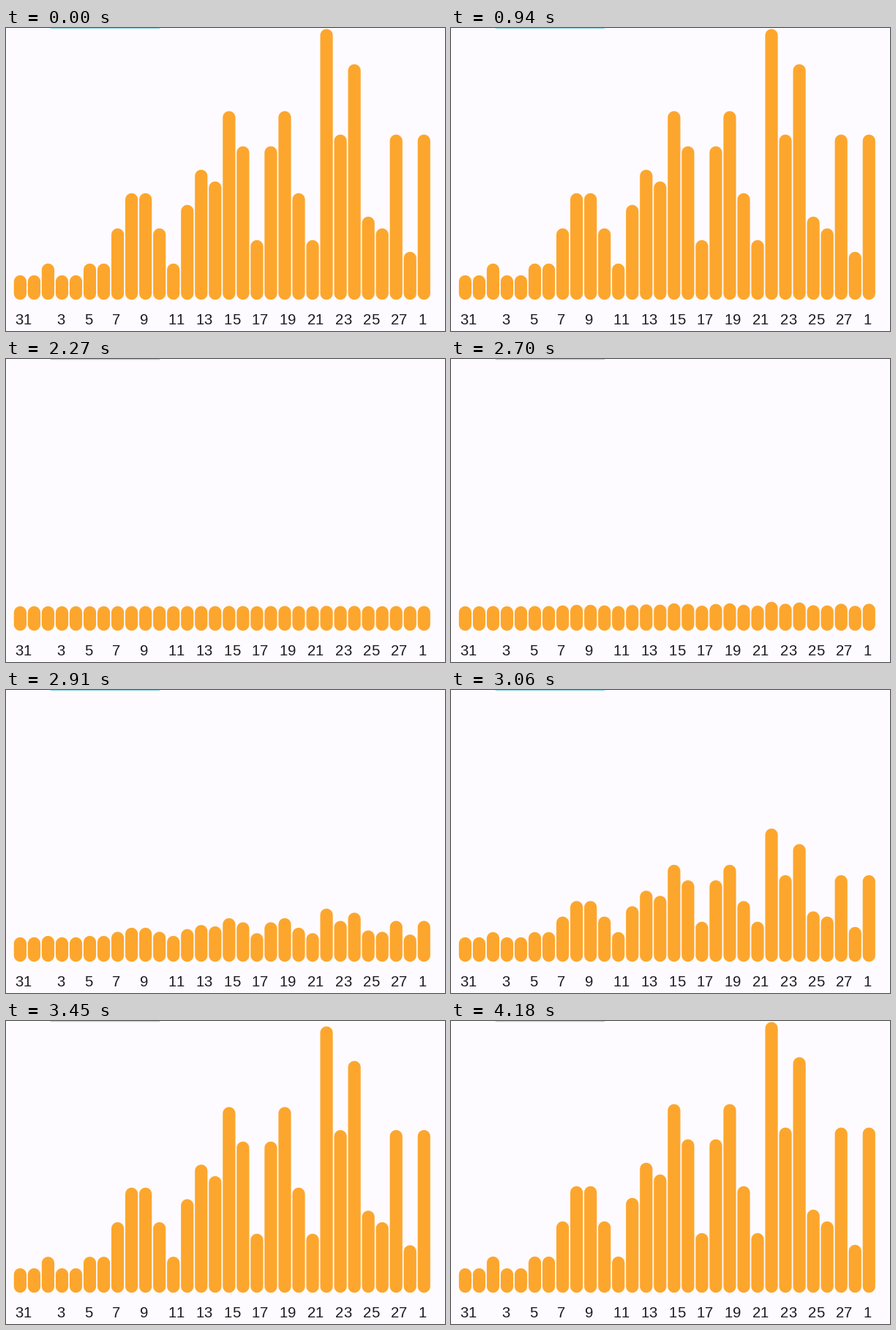
These frames come from a looping animation (600 px wide and 414 px high, 5.24 s). A matplotlib script:

```python
import matplotlib.pyplot as plt
from matplotlib.animation import FuncAnimation
from matplotlib.collections import LineCollection

W, H, DPI = 600, 414, 64
LOOP, STEP = 5240, 10
PT = 72 / DPI  # points per pixel

BACKGROUND, ORANGE, INK, BLUE = "#fdfbff", "#fda62d", "#1d1b20", "#9bdaea"
VALUES = [0, 0, 1, 0, 0, 1, 1, 4, 7, 7, 4, 1, 6, 9, 8, 14, 11, 3, 11, 14,
          7, 3, 21, 12, 18, 5, 4, 12, 2, 12]

FIRST_X, PITCH, BAR_WIDTH = 19.4, 19.03, 17.2
FLOOR, BASE_TOP, UNIT = 371.3, 337.8, 16.02
SHRINK = (1790, 2294)
GROW = (2294, 3854)


def ease_in_out_expo(t):
    if t <= 0:
        return 0.0
    if t >= 1:
        return 1.0
    if t < 0.5:
        return 0.5 * 2 ** (20 * t - 10)
    return 1 - 0.5 * 2 ** (10 - 20 * t)


def progress(ms, span):
    start, end = span
    return ease_in_out_expo((ms - start) / (end - start))


def bar_scale(ms):
    if ms < GROW[0]:
        return 1 - progress(ms, SHRINK)
    return progress(ms, GROW)


def bar_x(i):
    return FIRST_X + PITCH * i


def bar_segments(scale):
    cap = BAR_WIDTH / 2
    return [[(bar_x(i), FLOOR - cap),
             (bar_x(i), BASE_TOP - UNIT * value * scale + cap)]
            for i, value in enumerate(VALUES)]


def draw_label(i, text):
    # Digits are placed one by one so that every digit has the same advance.
    for k, digit in enumerate(text):
        ax.text(bar_x(i) - 7.3 + 11.2 * k, 405.3, digit, color=INK,
                family="Liberation Sans", size=20.3 * PT,
                ha="left", va="baseline")


fig = plt.figure(figsize=(W / DPI, H / DPI), dpi=DPI, facecolor=BACKGROUND)
ax = fig.add_axes([0, 0, 1, 1])
ax.set_xlim(0, W)
ax.set_ylim(H, 0)
ax.axis("off")

ax.plot([62, 209], [-0.5, -0.5], color=BLUE, lw=3.4 * PT,
        solid_capstyle="round", snap=False)

bars = LineCollection(bar_segments(1), colors=ORANGE,
                      linewidths=BAR_WIDTH * PT, capstyle="round")
bars.set_snap(False)
ax.add_collection(bars, autolim=False)

draw_label(0, "31")
for day in range(3, 29, 2):
    draw_label(day, str(day))
draw_label(29, "1")


def update(frame):
    ms = frame * STEP // 30 * 30
    bars.set_segments(bar_segments(bar_scale(ms)))
    return [bars]


anim = FuncAnimation(fig, update, frames=LOOP // STEP, interval=STEP,
                     repeat=True, repeat_delay=0, blit=False)
plt.show()
```
